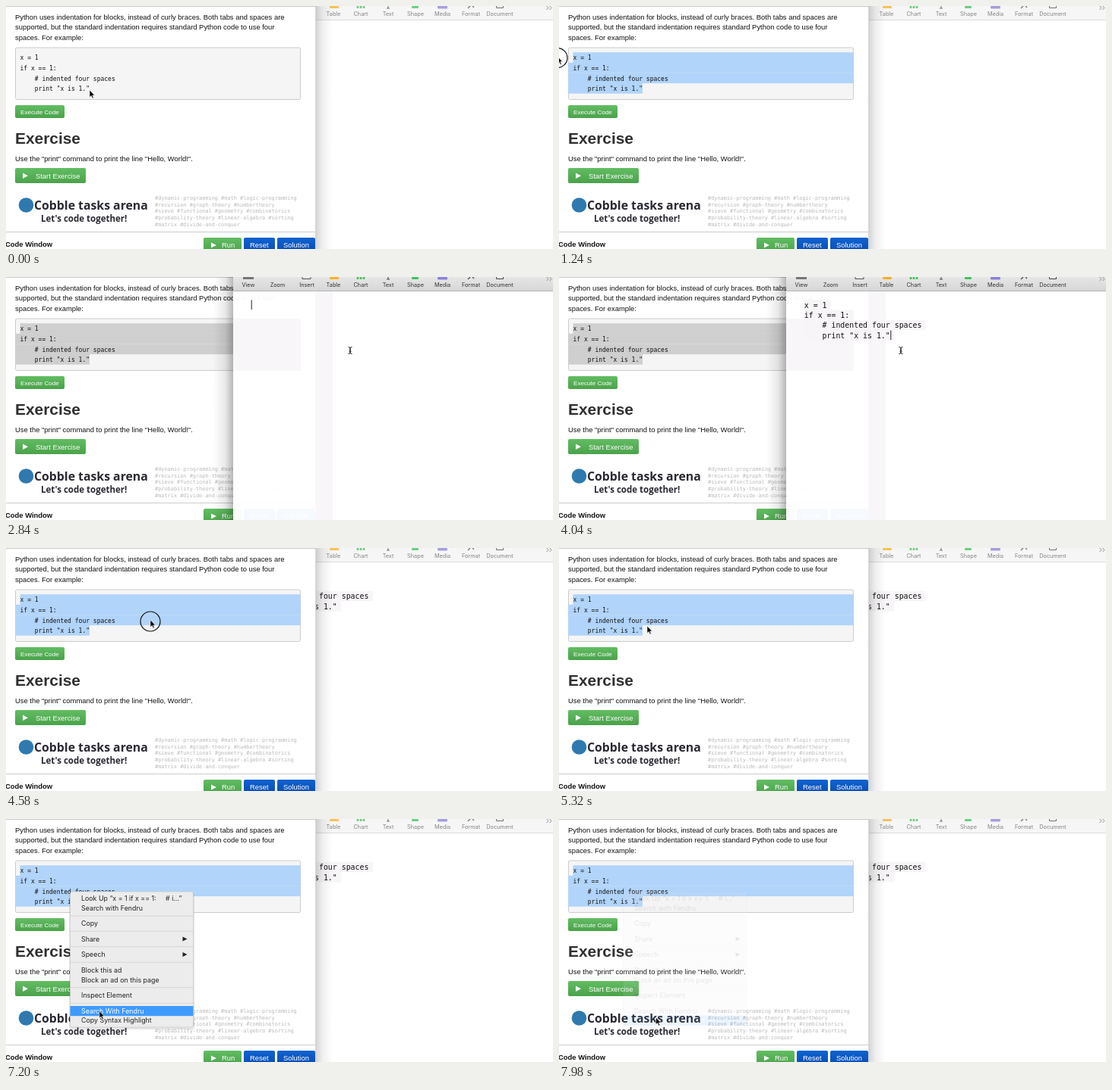
Write an HTML page that moves like this. It is 720 px wide and 321 px high and loops after 8000 ms.

```html
<!DOCTYPE html>
<html lang="en">
<head>
<meta charset="utf-8">
<title>Copying code between windows</title>
<style>
  html, body { margin: 0; width: 100%; height: 100%; overflow: hidden; background: #fff; }
  svg { display: block; width: 720px; height: 321px; }
  text { white-space: pre; }
  .body { font: 9.42px "Liberation Sans", Arial, sans-serif; fill: #111; }
  .title { font-size: 20.9px; font-weight: 700; fill: #303030; }
  .btn { font: 9.4px "Liberation Sans", Arial, sans-serif; fill: #fff; }
  .small { font-size: 8.1px; }
  .bold { font-weight: 700; }
  .mono { font-family: "DejaVu Sans Mono", monospace; }
  .brand { font-family: "Open Sans", sans-serif; font-weight: 700; fill: #2b2933; }
  .tool { font: 7.3px Inter, sans-serif; text-anchor: middle; }
  .item { font: 8.85px Inter, sans-serif; }
</style>
</head>
<body>
<svg id="stage" viewBox="0 0 720 321">
  <defs>
    <linearGradient id="green" x2="0" y2="1"><stop stop-color="#62bd62"/><stop offset="1" stop-color="#4ba24b"/></linearGradient>
    <linearGradient id="blue" x2="0" y2="1"><stop stop-color="#0f63d2"/><stop offset="1" stop-color="#0a4bb0"/></linearGradient>
    <linearGradient id="bar" x2="0" y2="1"><stop stop-color="#e6e6e6"/><stop offset="1" stop-color="#d6d6d6"/></linearGradient>
    <linearGradient id="fadeRight"><stop stop-opacity=".16"/><stop offset=".4" stop-opacity=".06"/><stop offset="1" stop-opacity="0"/></linearGradient>
    <linearGradient id="fadeLeft"><stop stop-opacity="0"/><stop offset=".6" stop-opacity=".09"/><stop offset="1" stop-opacity=".28"/></linearGradient>
  </defs>

  <g id="editor">
    <rect id="editorShadow" x="273" width="26" height="321" fill="url(#fadeLeft)"/>
    <rect x="299" width="421" height="321" fill="#fff" fill-opacity=".965"/>
    <g id="ghost" fill="#f8f6f9">
      <rect x="299" y="55" width="89" height="69"/>
      <rect x="407" y="19" width="23" height="302"/>
    </g>
    <rect id="toolbar" x="299" width="421" height="18.5"/>
    <path id="toolbarEdge" d="M299 18.5H720"/>
    <g id="icons">
      <rect x="312" width="14" height="3" fill="#777"/>
      <path d="M390 0V2.5H401V0" fill="none" stroke="#555"/>
      <rect x="426" width="12" height="3" rx="1" fill="#fbb021"/>
      <path d="M463 0V3M467 0V3M471 0V3" stroke="#45bf55" stroke-width="2.6"/>
      <path d="M503 0V3M501 3H505" stroke="#444"/>
      <rect x="534" width="9" height="3" rx="1" fill="#3fc35c"/>
      <rect x="568" width="13" height="3.5" rx="1" fill="#8a83d8"/>
      <path d="M608 3L611 0M614 0L616 2" stroke="#555" stroke-width="1.4"/>
      <path d="M645.5 0V2.5H654.5V0" fill="none" stroke="#444"/>
    </g>
    <g id="toolLabels" class="tool"></g>
    <path d="M711.5 0L714 2.5L711.5 5M715.5 0L718 2.5L715.5 5" fill="none" stroke="#888"/>
    <g id="pasted"></g>
    <rect id="caret" width="1" height="12.5" fill="#222"/>
  </g>

  <g id="browser">
    <rect id="browserShadow" x="408" width="22" height="321" fill="url(#fadeRight)"/>
    <rect width="408" height="321" fill="#fff"/>
    <path d="M0 .5H408" stroke="#c9c9c9"/>
    <path d="M407.7 0V321" stroke="#bbb" stroke-width=".7"/>
    <g class="body">
      <text x="12" y="18">Python uses indentation for blocks, instead of curly braces. Both tabs and spaces are</text>
      <text x="12" y="31.3">supported, but the standard indentation requires standard Python code to use four</text>
      <text x="12" y="44.6">spaces. For example:</text>
      <text x="12" y="204.5">Use the "print" command to print the line "Hello, World!".</text>
      <text class="title" x="12" y="182">Exercise</text>
      <text class="bold" x="-1" y="318">Code Window</text>
    </g>
    <rect x="12.5" y="55" width="375" height="68.5" rx="2" fill="#f5f5f5" stroke="#ccc"/>
    <g id="selection"></g>
    <g id="sample"></g>

    <rect x="12" y="131" width="65" height="17" rx="2" fill="url(#green)"/>
    <text class="btn small" x="19" y="142.5">Execute Code</text>
    <rect x="12" y="214" width="93" height="20" rx="2" fill="url(#green)"/>
    <path d="M22 220.5L29 224.2L22 228Z" fill="#fff"/>
    <text class="btn" x="39" y="227.7">Start Exercise</text>

    <circle cx="26.5" cy="263" r="9.8" fill="#2f79ae"/>
    <text class="brand" x="37" y="268.5" font-size="15.8">Cobble tasks arena</text>
    <text class="brand" x="46" y="285" font-size="11.5">Let's code together!</text>
    <g id="tags" class="mono" font-size="6.9" fill="#b9b9b9"></g>

    <path d="M0 298.5H408" stroke="#ccc"/>
    <rect x="260" y="306" width="50" height="20" rx="2" fill="url(#green)"/>
    <path d="M270 312.5L277 316L270 319.5Z" fill="#fff"/>
    <rect x="313" y="306" width="41" height="20" rx="2" fill="url(#blue)"/>
    <rect x="357" y="306" width="50" height="20" rx="2" fill="url(#blue)"/>
    <g class="btn">
      <text x="284" y="319">Run</text>
      <text x="321" y="319">Reset</text>
      <text x="365" y="319">Solution</text>
    </g>
    <rect id="scrollbar" x="402" y="176" width="4.5" height="135" rx="2.2" fill="#7d7d7d"/>
  </g>

  <g id="menu">
    <rect x="83" y="97" width="165" height="181" rx="4" opacity=".1"/>
    <rect x="84.5" y="96" width="162" height="179" rx="3" fill="#ececec" stroke="#c4c4c4" stroke-width=".6"/>
    <rect id="hover" x="84.5" width="162" height="13.2" fill="#3f9bfb"/>
    <path d="M85 128H246M85 148.3H246M85 168.7H246M85 189.3H246M85 222.7H246M85 243.3H246" stroke="#d6d6d6"/>
    <g id="items" class="item"></g>
  </g>

  <circle id="ring" r="13" fill="none" stroke="#111" stroke-width="1.2"/>
  <path id="arrow" d="M0 0V9.5L2.2 7.5L3.8 11L5.3 10.3L3.8 7H6.6Z" fill="#000" stroke="#fff" stroke-width=".6"/>
  <path id="beam" d="M-2.5 -4.5Q0 -4.5 0 -3V3Q0 4.5 -2.5 4.5M2.5 -4.5Q0 -4.5 0 -3V3Q0 4.5 2.5 4.5M-1.5 1H1.5" fill="none" stroke="#222"/>
</svg>
<script>
const LOOP = 8000;
const $ = id => document.getElementById(id);
const clamp = (v, lo = 0, hi = 1) => Math.min(hi, Math.max(lo, v));
const ramp = (t, from, to) => clamp((t - from) / (to - from));
const within = (t, from, to) => t >= from && t < to;

function add(parent, tag, attrs, text = '') {
  const el = document.createElementNS('http://www.w3.org/2000/svg', tag);
  set(el, attrs);
  el.textContent = text;
  parent.append(el);
  return el;
}
function set(el, attrs) {
  for (const key in attrs) el.setAttribute(key, attrs[key]);
}
const show = (el, on) => { el.style.display = on ? '' : 'none'; };

const code = ['x = 1', 'if x == 1:', '    # indented four spaces', '    print "x is 1."'];
code.forEach((line, i) => {
  add($('sample'), 'text', { class: 'mono', x: 18.5, y: 71 + i * 13.8, 'font-size': 8, fill: '#111' }, line);
  add($('pasted'), 'rect', { x: 323, y: 30 + i * 13.4, width: line.length * 5.96 + 5, height: 13.4, fill: '#f7f5f7' });
  add($('pasted'), 'text', { class: 'mono', x: 322.8, y: 40.5 + i * 13.4, 'font-size': 9.9, fill: '#111' }, line);
});

[
  '#dynamic-programming #math #logic-programming',
  '#recursion #graph-theory #numbertheory',
  '#sieve #functional #geometry #combinatorics',
  '#probability-theory #linear-algebra #sorting',
  '#matrix #divide-and-conquer'
].forEach((line, i) => add($('tags'), 'text', { x: 196, y: 255.7 + i * 8.8 }, line));

const tools = { View: 319, Zoom: 357.5, Insert: 396, Table: 431, Chart: 467, Text: 503, Shape: 539, Media: 574.5, Format: 612, Document: 650 };
for (const name in tools) add($('toolLabels'), 'text', { x: tools[name], y: 13 }, name);

const items = [
  [104.5, 'Look Up “x = 1 if x == 1:     # i...”'],
  [117.5, 'Search with Fendru'],
  [138, 'Copy'],
  [158.5, 'Share', true],
  [179, 'Speech', true],
  [199.7, 'Block this ad'],
  [212.3, 'Block an ad on this page'],
  [233, 'Inspect Element'],
  [253.5, 'Search With Fendru'],
  [266, 'Copy Syntax Highlight']
].map(([y, label, sub]) => {
  const g = add($('items'), 'g', {});
  add(g, 'text', { x: 99, y: y + 3.2 }, label);
  if (sub) add(g, 'path', { d: `M232.5 ${y - 3}L238.5 ${y}L232.5 ${y + 3}Z` });
  return { y, g };
});

const rows = code.map(() => add($('selection'), 'rect', { height: 13.7 }));

// time, x, y of the pointer
const path = [
  [0, 110, 111], [440, 110, 111], [680, 114, 107], [920, 114, 107],
  [1240, -2, 66.5], [1940, -2, 66.5], [2560, 453, 97], [4020, 453, 97],
  [4040, 450, 97], [4400, 190, 95], [4640, 190, 95], [4840, 164, 95],
  [4860, 164, 95], [5160, 116, 103], [5320, 116, 103], [5540, 84, 96],
  [6220, 84, 96], [6340, 111, 181], [6360, 114, 194], [6940, 122, 252],
  [7140, 122, 252], [7380, 127.5, 262], [LOOP, 127.5, 262]
];
const clicks = [[440, 1520], [2560, 2720], [4440, 4620], [5800, 5880], [7540, 7680]];

function pointer(time) {
  const t = clamp(time, 0, LOOP - 1);
  const i = path.findIndex(p => p[0] > t);
  const [t0, x0, y0] = path[i - 1], [t1, x1, y1] = path[i];
  const u = ramp(t, t0, t1), e = u * u * (3 - 2 * u);
  return [x0 + (x1 - x0) * e, y0 + (y1 - y0) * e];
}

function drawSelection(t, blue) {
  show($('selection'), t >= 920);
  const [px, py] = pointer(clamp(t, 920, 1240));
  const first = clamp(Math.floor((py - 61) / 13.6), 0, 3);
  const startX = 18.5 + clamp(Math.round((px - 18.5) / 4.816), 0, code[first].length) * 4.816;
  rows.forEach((row, i) => {
    const x = i === first ? startX : 12;
    const end = i === 3 ? 110 : 387.5;
    set(row, { x, y: 61.2 + i * 13.6, width: i < first ? 0 : Math.max(0, end - x), fill: blue ? '#b1d4fa' : '#cfcfcf' });
  });
}

function drawMenu(t) {
  const alpha = t < 7000 ? ramp(t, 5780, 5860) : 1 - .9 * ramp(t, 7700, 7960);
  show($('menu'), t >= 5800);
  set($('menu'), { opacity: alpha });
  // the highlight trails the pointer slightly
  const y = pointer(t - 20)[1];
  const hit = t > 6220 && !within(t, 7580, 7640) && items.find(item => Math.abs(item.y - y) < 6.8);
  show($('hover'), hit);
  if (hit) set($('hover'), { y: hit.y - 6.5 });
  items.forEach(item => set(item.g, { fill: item === hit ? '#fff' : '#222' }));
  set($('scrollbar'), { opacity: ramp(t, 5800, 5880) * (1 - ramp(t, 6500, 6900)) });
}

let order = null;
function drawWindows(t) {
  const front = within(t, 2600, 4480);
  const active = within(t, 2760, 4480);
  if (order !== front) {
    order = front;
    $('stage').insertBefore(front ? $('editor') : $('browser'), $('menu'));
    show($('editorShadow'), front);
    show($('ghost'), front);
    show($('browserShadow'), !front);
  }
  set($('toolbar'), { fill: active ? 'url(#bar)' : '#f6f6f6' });
  set($('toolbarEdge'), { stroke: active ? '#b4b4b4' : '#dcdcdc' });
  set($('toolLabels'), { fill: active ? '#333' : '#858585' });
  set($('icons'), { opacity: active ? 1 : .75 });

  const pasted = t >= 3440;
  show($('pasted'), pasted);
  show($('caret'), front);
  set($('caret'), pasted ? { x: 436.3, y: 70.5 } : { x: 322.7, y: 30.5 });
  drawSelection(t, !front);
}

function drawPointer(t) {
  const [x, y] = pointer(t);
  const beam = within(t, 2480, 4200);
  show($('arrow'), !beam);
  show($('beam'), beam);
  set($(beam ? 'beam' : 'arrow'), { transform: `translate(${x} ${y})` });
  show($('ring'), clicks.some(([from, to]) => within(t, from, to)));
  set($('ring'), { cx: x, cy: y + (beam ? 0 : 2) });
}

const start = performance.now();
function frame() {
  const t = Math.max(0, performance.now() - start) % LOOP;
  drawWindows(t);
  drawMenu(t);
  drawPointer(t);
  requestAnimationFrame(frame);
}
frame();
</script>
</body>
</html>
```
